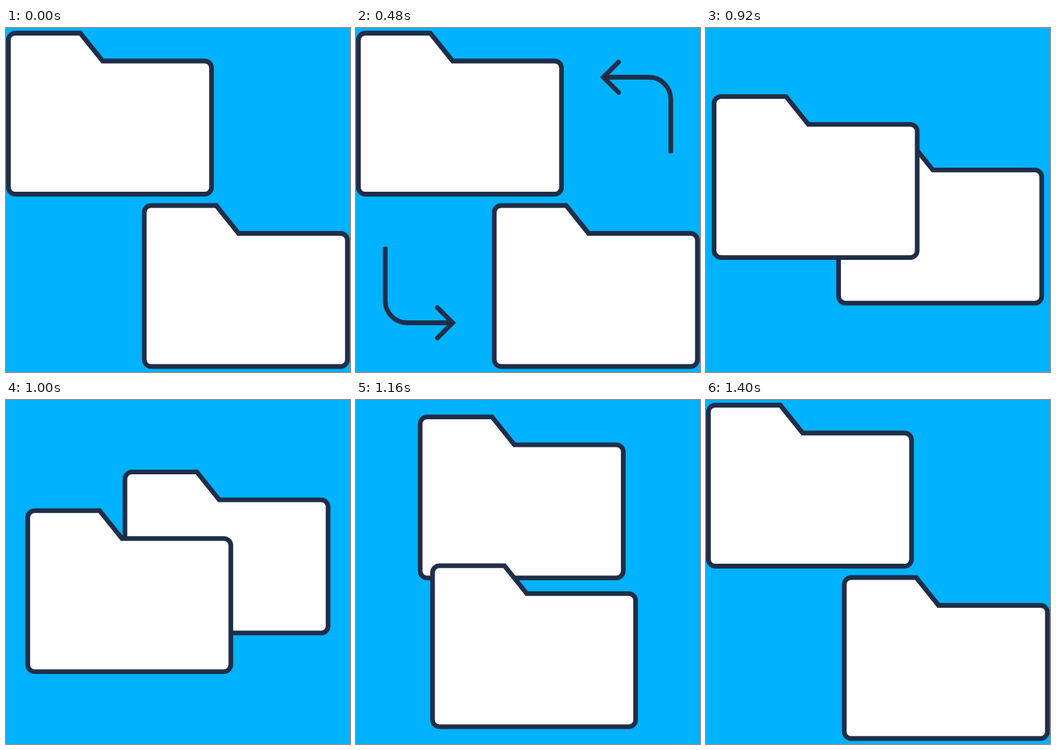
These frames come from a looping animation (500 by 500 pixels, 2.04 s). An HTML page:

```html
<!DOCTYPE html>
<html lang="en">
<head>
<meta charset="utf-8">
<title>Folder swap</title>
<style>
  html, body { margin: 0; width: 100%; height: 100%; overflow: hidden; background: #00b2ff; }
  svg { display: block; width: 100vw; height: 100vh; }
</style>
</head>
<body>
<svg viewBox="0 0 500 500" fill="none" stroke="#1f2e48" stroke-width="6.8" stroke-miterlimit="10">
  <defs>
    <path id="folder" fill="#fff" d="M108 7.5H13.5a10 10 0 0 0-10 10V231.5a10 10 0 0 0 10 10H288.7a10 10 0 0 0 10-10V58a10 10 0 0 0-10-10H140.5Z"/>
    <g id="arrow">
      <path id="shaft" d="M457.5 182V103.5a32 32 0 0 0-32-32H359.5"/>
      <path id="head" d="M-22.2-22.2L0 0L-22.2 22.2" stroke-linecap="round"/>
    </g>
    <path id="route" d="M0 0Q0 250.5 197.5 250.5"/>
  </defs>
  <g id="arrows">
    <use href="#arrow"/>
    <use href="#arrow" transform="rotate(180 250 250)"/>
  </g>
  <use id="back" href="#folder"/>
  <use id="front" href="#folder"/>
</svg>
<script>
const LOOP = 2040, STEP = 40;
const DRAWN = 480, ERASED = 800, SWAPPED = 1400;
const [shaft, head, route, arrows, back, front] =
  ['shaft', 'head', 'route', 'arrows', 'back', 'front'].map(id => document.getElementById(id));
const shaftLen = shaft.getTotalLength();
const routeLen = route.getTotalLength();

const bezier = (a, b, p) => 3 * (1 - p) ** 2 * p * a + 3 * (1 - p) * p * p * b + p ** 3;

// Leaves at constant speed, arrives softly: cubic-bezier(1/6, 1/6, 2/3, 1)
function ease(x) {
  if (x <= 0) return 0;
  if (x >= 1) return 1;
  let lo = 0, hi = 1;
  for (let i = 0; i < 24; i++) {
    const mid = (lo + hi) / 2;
    if (bezier(1 / 6, 2 / 3, mid) < x) lo = mid; else hi = mid;
  }
  return bezier(1 / 6, 1, lo);
}

const progress = (t, from, to) => ease((t - from) / (to - from));

function place(el, x, y) {
  el.setAttribute('transform', `translate(${x} ${y})`);
}

function drawArrows(t) {
  const visible = t > 0 && t <= ERASED;
  arrows.style.display = visible ? '' : 'none';
  if (!visible) return;

  const end = shaftLen * progress(t, 0, DRAWN);
  const start = shaftLen * progress(t, DRAWN, ERASED);
  shaft.style.display = end - start > 0.1 ? '' : 'none';
  shaft.setAttribute('stroke-dasharray', `0 ${start} ${end - start} ${2 * shaftLen}`);

  const tip = shaft.getPointAtLength(end);
  const from = shaft.getPointAtLength(Math.max(0, end - 1));
  const angle = Math.atan2(tip.y - from.y, tip.x - from.x) * 180 / Math.PI;
  head.setAttribute('transform', `translate(${tip.x} ${tip.y}) rotate(${angle})`);
}

function drawFolders(t) {
  const p = route.getPointAtLength(routeLen * progress(t, ERASED, SWAPPED));
  place(front, p.x, p.y);
  place(back, 197.5 - p.x, 250.5 - p.y);
}

const begin = performance.now();

function frame() {
  const now = Math.max(0, performance.now() - begin) % LOOP;
  const t = Math.floor(now / STEP) * STEP;
  drawArrows(t);
  drawFolders(t);
  requestAnimationFrame(frame);
}
frame();
</script>
</body>
</html>
```
